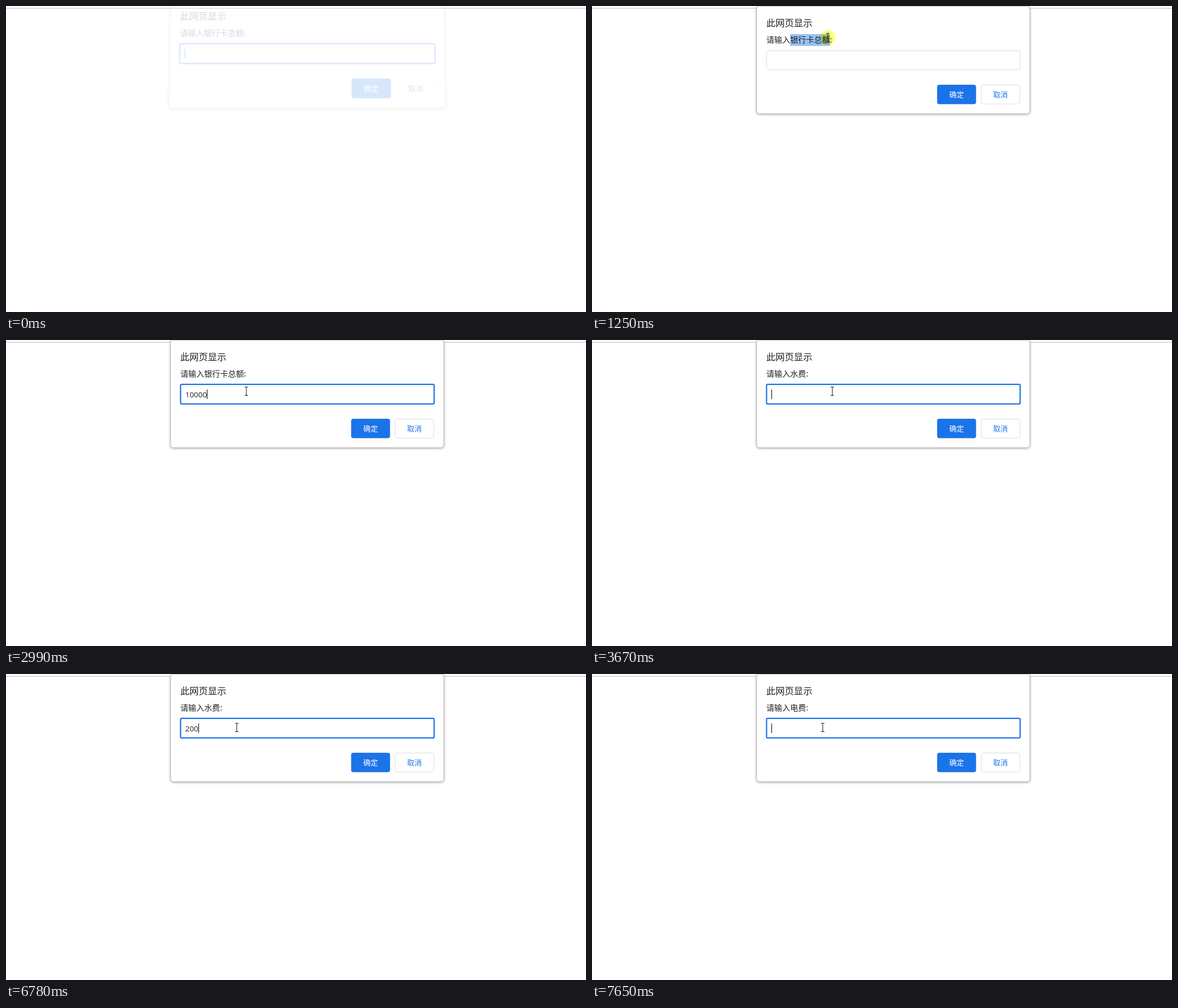
These frames come from a looping animation (1028x544 px, 8 s). An HTML page:

```html
<!DOCTYPE html>
<html lang="zh-CN">
<head>
<meta charset="utf-8">
<style>
  html, body { margin: 0; width: 100%; height: 100%; overflow: hidden; background: #fff; }
  body { position: relative; }
  svg, .rule, #halo { position: absolute; left: 0; top: 0; }
  svg { overflow: visible; }
  .rule { top: 3px; width: 100%; height: 1.5px; background: #dadce0; }
  #dialog { transform-origin: 534px 0; }
  text { font-family: "Noto Sans CJK SC", "Noto Sans CJK", sans-serif; fill: #202124; }
  #panel { filter: drop-shadow(0 1px 2px rgba(0, 0, 0, .35)); }
  #title { font-size: 16.3px; }
  #label { font-size: 14.1px; }
  #value { font-family: "Open Sans", "Noto Sans", sans-serif; font-size: 13.4px; }
  .button { font-size: 13px; text-anchor: middle; }
  #halo { width: 26px; height: 26px; margin: -13px; border-radius: 50%;
          background: #ffff78; mix-blend-mode: multiply; }
</style>
</head>
<body>
<div class="rule"></div>
<svg id="dialog" width="1028" height="200">
  <rect id="panel" x="291.8" y="0.3" width="484.2" height="191" rx="4.5" fill="#fff" stroke="#bcbcbc"/>
  <rect id="mark" x="351.3" y="50" height="21" fill="#9ac1f4"/>
  <text id="title" x="309" y="36.2">此网页显示</text>
  <text id="label" x="309" y="65.3"></text>
  <rect id="idle" x="309.5" y="79.5" width="448.8" height="34" rx="2" fill="#fff" stroke="#dadce0"/>
  <rect id="focus" x="309.4" y="78.9" width="449.4" height="34.8" rx="2" fill="#fff" stroke="#1a73e8" stroke-width="2.2"/>
  <text id="value" x="317.8" y="101.8"></text>
  <rect id="caret" y="88" width="1" height="17" fill="#000"/>
  <rect x="611.7" y="140" width="69" height="34.5" rx="4" fill="#1a73e8"/>
  <text class="button" x="646.2" y="162.4" style="fill:#fff;font-weight:500">确定</text>
  <rect x="689.7" y="140.4" width="68.6" height="33.8" rx="4" fill="#fff" stroke="#dadce0"/>
  <text class="button" x="724" y="162.4" style="fill:#1a73e8">取消</text>
</svg>
<div id="halo"></div>
<svg id="pointer" width="20" height="20">
  <path id="beam" d="M-3-7.5h2.2L0-6.8 .8-7.5H3M0-7V7M-3 7.5h2.2L0 6.8 .8 7.5H3" fill="none" stroke="#222" stroke-width="1.1"/>
  <path id="arrow" d="M0 0V15.5L3.6 12.2 6 17.6 8.2 16.6 5.8 11.4H10.8Z" fill="#fff" stroke="#000" stroke-width=".9"/>
</svg>
<script>
const LOOP = 8000, TICK = 69, BLINK = 530, CHAR = 14.1;
const $ = id => document.getElementById(id);
const show = (id, on) => $(id).style.display = on ? '' : 'none';
const within = (t, a, b) => t >= a && t < b;
const last = (list, t) => list.filter(item => item.t <= t).pop();

const dialogs = [
  { t: 0, label: '请输入银行卡总额:', rise: 205 },
  { t: 3590, label: '请输入水费:', rise: 80 },
  { t: 7510, label: '请输入电费:', rise: 140 }
];

const typing = [
  { t: 0, text: '' },
  { t: 2520, text: '1' }, { t: 2590, text: '10' },
  { t: 2790, text: '100' }, { t: 2860, text: '1000' }, { t: 2990, text: '10000' },
  { t: 3590, text: '' },
  { t: 6500, text: '2' }, { t: 6580, text: '20' }, { t: 6780, text: '200' },
  { t: 7510, text: '' }
];

// Moments at which the caret restarts its blink
const wakes = [0, 1790, 2520, 2590, 2790, 2860, 2990, 3590, 5360, 6500, 6580, 6780, 7510].map(t => ({ t }));

const moves = [
  { t: 270, end: 830, from: [20, 2], to: [351, 56] },
  { t: 900, end: 1250, from: [351, 56], to: [418, 56] },
  { t: 1450, end: 1720, from: [418, 56], to: [426, 91] },
  { t: 4060, end: 4340, from: [426, 91], to: [351, 55] },
  { t: 4410, end: 4820, from: [351, 55], to: [413, 55] },
  { t: 5020, end: 5290, from: [413, 55], to: [409, 95] }
];

// Press on the label, release, then click back into the field
const drags = [
  { down: 900, up: 1450, click: 1790, done: 1860 },
  { down: 4410, up: 5020, click: 5360, done: 5430 }
];

function pointerAt(t) {
  const m = last(moves, t);
  if (!m) return null;
  const stepped = Math.floor((t - m.t) / TICK + 1e-6) * TICK;
  const p = t >= m.end ? 1 : Math.min(1, stepped / (m.end - m.t));
  const e = p * p * (3 - 2 * p);
  return m.from.map((a, i) => a + (m.to[i] - a) * e);
}

function drawDialog(t) {
  const d = last(dialogs, t), box = $('dialog').style;
  const age = Math.floor((t - d.t) / TICK) * TICK;
  const left = t - d.t >= d.rise ? 0 : (1 - Math.min(1, age / d.rise)) ** 2;
  const closing = t >= 7450 && t < 7510 ? 0 : within(t, 7380, 7450) ? 0.5 : 1;
  box.opacity = (1 - 0.82 * left) * closing;
  box.transform = left
    ? `translateY(${-12 * left}px) perspective(1000px) rotateX(${3.7 * left}deg)` : 'none';
  $('label').textContent = d.label;
  return d.label;
}

function drawField(t, focused) {
  const text = last(typing, t).text;
  const lit = Math.floor((t - last(wakes, t).t) / BLINK) % 2 === 0;
  $('value').textContent = text;
  show('focus', focused);
  show('idle', !focused);
  show('caret', focused && lit);
  $('caret').setAttribute('x', Math.round(317.8 + text.length * 7.67));
}

function drawPointer(t, at) {
  show('pointer', at);
  show('halo', at && drags.some(d => within(t, d.down, d.up) || within(t, d.click, d.done)));
  if (!at) return;
  const place = `translate(${at[0]}px, ${at[1]}px)`;
  $('pointer').style.transform = $('halo').style.transform = place;
  show('arrow', t < 830);
  show('beam', t >= 830);
}

function draw(t) {
  const at = pointerAt(t);
  const drag = drags.find(d => within(t, d.down, d.click));
  const label = drawDialog(t);
  drawField(t, !drag);
  drawPointer(t, at);
  show('mark', drag);
  if (drag) {
    const reach = t < drag.up ? at[0] : pointerAt(drag.up)[0];
    const rest = (label.length - 4) * CHAR + 3.9;
    $('mark').setAttribute('width', Math.min(rest, Math.round((reach - 351) / CHAR) * CHAR));
  }
}

const start = performance.now();
function frame() {
  draw((performance.now() - start) % LOOP);
  requestAnimationFrame(frame);
}
draw(0);
requestAnimationFrame(frame);
</script>
</body>
</html>
```
